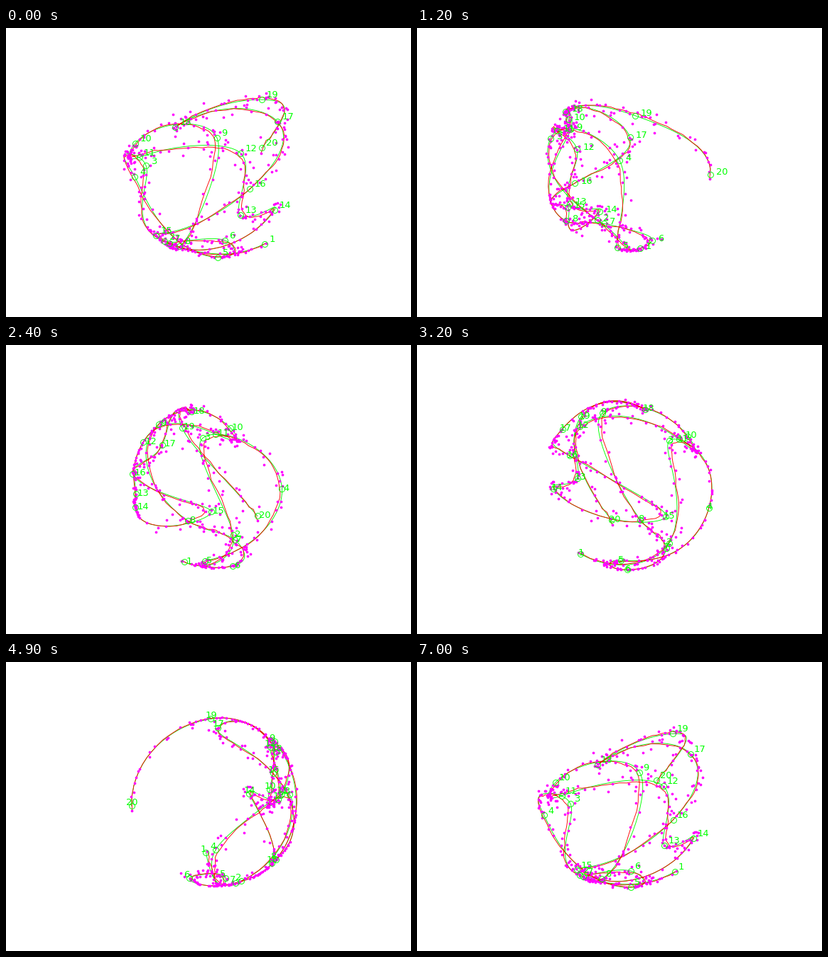
A matplotlib script that plays this animation: 570 by 408 pixels, repeating every 7.1 s.

```python
import numpy as np
import matplotlib.pyplot as plt
from matplotlib.animation import FuncAnimation

W, H, DPI = 570, 408, 100
FRAMES, STEP = 71, 5
CENTER_X, CENTER_Y = 0.5175 * W, 0.4825 * H
BOX_HEIGHT = 0.815 * H
ELEV = np.radians(20)
PER_SEGMENT = 20
NOISE = 0.05
LABEL_SHIFT = 0.05
GREEN, RED, MAGENTA = "#00ff00", "#ff0000", "#ff00ff"

# Key points of the route: longitude and latitude in degrees
STOPS = [(-13, -57), (-172, -56), (-141, 14), (155, -15), (-80, -82),
         (71, -72), (-177, -60), (-123, -44), (-89, 39), (-161, 23),
         (-150, 17), (-72, 28), (-74, -12), (-49, -13), (-146, -39),
         (-68, 5), (-27, 41), (-127, 43), (-19, 58), (60, -5)]


def globe(lon, lat):
    return np.column_stack([np.cos(lon) * np.cos(lat),
                            np.sin(lon) * np.cos(lat),
                            np.sin(lat)])


def on_sphere(p):
    return p / np.linalg.norm(p, axis=1, keepdims=True)


def spline(knots, t):
    """Natural cubic spline with unit knot spacing."""
    n = len(knots)
    system = np.eye(n)
    rhs = np.zeros_like(knots)
    for i in range(1, n - 1):
        system[i, i - 1:i + 2] = 1, 4, 1
        rhs[i] = 6 * (knots[i - 1] - 2 * knots[i] + knots[i + 1])
    m = np.linalg.solve(system, rhs)
    k = np.minimum(t.astype(int), n - 2)
    u = (t - k)[:, None]
    v = 1 - u
    return (v * knots[k] + u * knots[k + 1]
            + ((v**3 - v) * m[k] + (u**3 - u) * m[k + 1]) / 6)


def smooth(p, half=5):
    """Moving average whose window shrinks towards the ends."""
    out = np.empty_like(p)
    for i in range(len(p)):
        h = min(half, i, len(p) - 1 - i)
        out[i] = p[i - h:i + h + 1].mean(axis=0)
    return out


def project(p, angle):
    """Orthographic view, scaled so the turning cube fills the height."""
    c, s = np.cos(angle), np.sin(angle)
    across = p[:, 0] * c + p[:, 1] * s
    away = p[:, 1] * c - p[:, 0] * s
    extent = np.cos(ELEV) + np.sin(ELEV) * (abs(c) + abs(s))
    scale = BOX_HEIGHT / (2 * extent)
    up = p[:, 2] * np.cos(ELEV) + away * np.sin(ELEV)
    return CENTER_X + scale * across, CENTER_Y - scale * up


rng = np.random.default_rng(4)
knots = globe(*np.radians(STOPS).T)
last = len(knots) - 1
path = on_sphere(spline(knots, np.linspace(0, last, last * PER_SEGMENT + 1)))
samples = on_sphere(path + rng.normal(0, NOISE, path.shape))
fit = on_sphere(smooth(samples))

fig = plt.figure(figsize=(W / DPI, H / DPI), dpi=DPI, facecolor="white")
ax = fig.add_axes([0, 0, 1, 1])
ax.set_xlim(0, W)
ax.set_ylim(H, 0)
ax.axis("off")


def px(n):
    return n * 72 / DPI


def curve(color):
    return ax.plot([], [], color=color, lw=px(0.9))[0]


def dots(color, size, edge, fill):
    return ax.plot([], [], "o", color=color, ms=px(size), mew=px(edge),
                   mfc=fill)[0]


layers = [
    (path, curve(GREEN)),
    (fit, curve(RED)),
    (samples, dots(MAGENTA, 3.7, 0, MAGENTA)),
    (knots, dots(GREEN, 8, 0.9, "none")),
]
labels = [ax.text(0, 0, str(i + 1), color=GREEN, family="DejaVu Sans",
                  fontsize=px(13), va="baseline")
          for i in range(len(knots))]


def draw(frame):
    angle = np.radians(STEP * frame)
    for points, line in layers:
        line.set_data(*project(points, angle))
    for label, x, y in zip(labels, *project(knots + LABEL_SHIFT, angle)):
        label.set_position((x, y + 5.5))
    return [line for _, line in layers] + labels


anim = FuncAnimation(fig, draw, frames=FRAMES, interval=100,
                     repeat=True, repeat_delay=0, blit=False)
plt.show()
```
